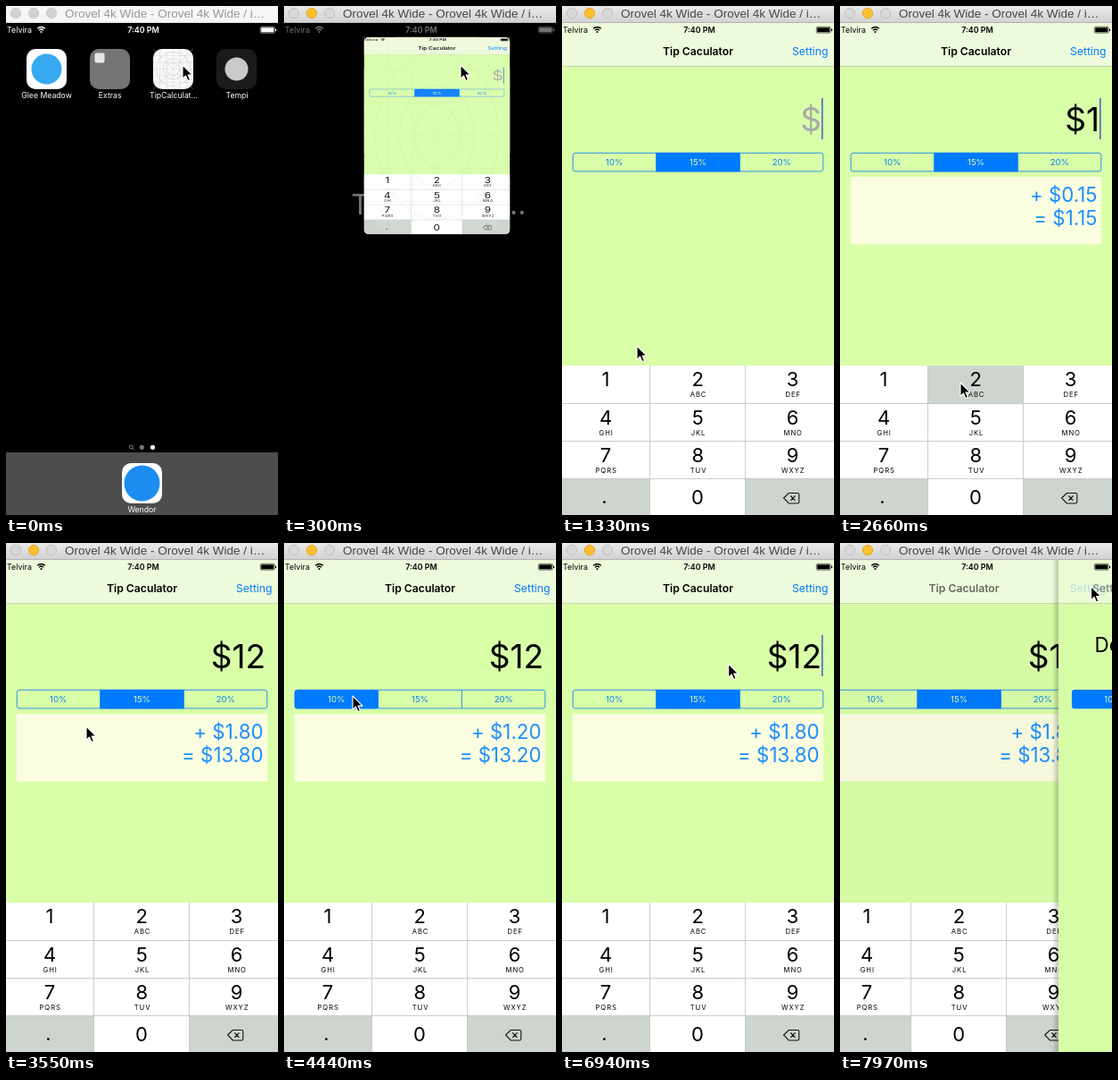
Animation of 305x569 px, one loop 8 s. Source, as an HTML page:

```html
<!DOCTYPE html>
<html lang="en">
<head>
<meta charset="utf-8">
<title>Tip calculator demo</title>
<style>
html, body { margin: 0; width: 100%; height: 100%; overflow: hidden; background: #000; }
svg { display: block; width: 305px; height: 569px; font-family: Inter, "Liberation Sans", sans-serif; }
.mid { text-anchor: middle; }
.end { text-anchor: end; }
.status { font-size: 8.9px; }
.bold { font-weight: 600; }
.label { font-size: 8.7px; fill: #fff; text-anchor: middle; }
.nav { font-size: 12.2px; }
.amount { font-size: 37px; }
.result { font-size: 22.3px; fill: #1f8fff; text-anchor: end; }
.seg { font-size: 9.6px; text-anchor: middle; }
.digit { font-size: 22px; text-anchor: middle; }
.abc { font-size: 7.7px; letter-spacing: .9px; text-anchor: middle; }
.title { font: 13.5px "Liberation Sans", Arial, sans-serif; }
</style>
</head>
<body>
<svg viewBox="0 0 305 569">
  <defs>
    <linearGradient id="bar" x2="0" y2="1">
      <stop offset="0" stop-color="#e9e9e9"/><stop offset="1" stop-color="#d2d2d2"/>
    </linearGradient>
    <linearGradient id="shade">
      <stop offset="0" stop-color="#000" stop-opacity="0"/><stop offset="1" stop-color="#000" stop-opacity=".22"/>
    </linearGradient>
    <clipPath id="round"><rect id="mask" y="19" width="305" height="550"/></clipPath>
    <g id="grid">
      <rect width="45" height="45" rx="10" fill="#f9f9f9"/>
      <g id="lines" fill="none" stroke="#c9c9c9" stroke-width=".6"></g>
    </g>
    <g id="status">
      <text class="status" x="1" y="29.8">Telvira</text>
      <text class="status bold mid" x="154" y="29.8">7:40 PM</text>
      <g fill="none" stroke="currentColor" stroke-width="1.3">
        <path d="M35.2 25.3a6 6 0 0 1 8.6 0M37 27.2a3.6 3.6 0 0 1 5 0"/>
      </g>
      <circle cx="39.5" cy="29" r="1.1"/>
      <rect x="285.3" y="23.3" width="15.900" height="6.800" rx="1.400" fill="none" stroke="currentColor" stroke-width=".6"/>
      <rect x="286.2" y="24.2" width="14.100" height="5" rx=".6"/>
      <rect x="302" y="25.4" width="1.100" height="2.600" rx=".5"/>
    </g>
  </defs>

  <rect width="305" height="569"/>
  <g id="home">
    <rect x="23" y="48" width="45" height="45" rx="10" fill="#fff"/>
    <circle cx="45.5" cy="70.5" r="17" fill="#37a9f0"/>
    <text class="label" x="45.5" y="102.5">Glee Meadow</text>
    <rect x="94" y="48" width="45" height="45" rx="10" fill="#757575"/>
    <rect x="99.5" y="52.5" width="11" height="11" rx="2" fill="#e2e6e8"/>
    <text class="label" x="116.7" y="102.5">Extras</text>
    <use href="#grid" x="165" y="48"/>
    <rect id="press" x="165" y="48" width="45" height="45" rx="10" opacity="0"/>
    <text class="label" x="188" y="102.5">TipCalculat...</text>
    <rect x="236" y="48" width="45" height="45" rx="10" fill="#1b1b1b"/>
    <circle cx="258.5" cy="70.5" r="13" fill="#c9c9c9"/>
    <text class="label" x="259" y="102.5">Tempi</text>
    <circle cx="140.3" cy="493" r="2" fill="none" stroke="#888"/>
    <path d="M141.8 494.5l2 2" stroke="#888"/>
    <circle cx="152.3" cy="493.3" r="2.6" fill="#777"/>
    <circle cx="164.5" cy="493.3" r="2.6" fill="#fff"/>
    <rect y="499" width="305" height="70" fill="#4d4d4d"/>
    <rect x="130" y="511" width="45" height="45" rx="10" fill="#fff"/>
    <circle cx="152.5" cy="533.5" r="20" fill="#1c8cf0"/>
    <text class="label" x="152.5" y="565.8">Wendor</text>
  </g>
  <use id="homeStatus" href="#status" fill="#fff" color="#fff"/>

  <g id="app">
    <g clip-path="url(#round)">
      <rect y="19" width="305" height="550" fill="#d9fea8"/>
      <g id="page">
        <text id="amount" class="amount end" x="291" y="140"></text>
        <rect id="caret" x="291" y="103" width="1.6" height="46" fill="#426bc8"/>
        <g id="tabs"></g>
        <g id="panel">
          <rect x="11.8" y="191" width="281.4" height="75.5" fill="#fafde0"/>
          <text id="tip" class="result" x="288.5" y="218.9"></text>
          <text id="total" class="result" x="288.5" y="245.4"></text>
        </g>
        <g id="keys"></g>
      </g>
      <rect y="19" width="305" height="48.5" fill="#eefadc"/>
      <rect y="67" width="305" height=".7" fill="#bccaa2"/>
      <rect id="dim" y="67" width="305" height="335" opacity="0"/>
      <g id="next">
        <rect x="-7" y="19" width="7" height="550" fill="url(#shade)"/>
        <rect y="19" width="305" height="550" fill="#d7fca6"/>
        <rect y="19" width="305" height="48" fill="#ebfbd3"/>
        <rect y="67" width="305" height=".7" fill="#bccaa2"/>
        <text x="40.7" y="122.2" font-size="22.3">Default</text>
        <rect x="15" y="163.9" width="92" height="21.4" rx="3" fill="#007aff"/>
        <text class="seg" x="61" y="178.4" fill="#d9fea8">10%</text>
        <text class="nav bold" x="38" y="55" fill="#8d9688">Setting</text>
      </g>
      <text id="heading" class="nav bold mid" x="152.5" y="55">Tip Caculator</text>
      <text id="setting" class="nav end" x="298.5" y="55" fill="#007aff">Setting</text>
      <use href="#status" color="#000"/>
    </g>
    <use id="ghost" href="#grid" transform="translate(0 19) scale(6.778 12.222)"/>
  </g>

  <g>
    <rect id="bar1" width="305" height="18.5"/>
    <rect id="edge" y="18" width="305" height="1"/>
    <g id="dots"></g>
    <text id="title" class="title" x="66" y="13">Orovel 4k Wide - Orovel 4k Wide / i…</text>
  </g>
  <path id="cursor" d="M0 0V15.3L3.5 12 6 17.6 8.5 16.5 6.1 11.1H11Z" stroke="#fff" stroke-width="1.1" stroke-linejoin="round"/>
</svg>

<script>
const LOOP = 8000, STEP = 147.65;
const $ = id => document.getElementById(id);
const set = (id, attrs) => { for (const a in attrs) $(id).setAttribute(a, attrs[a]); };
const show = (id, on) => set(id, { opacity: +on });
const mix = (a, b, p) => a + (b - a) * p;
const text = (cls, x, y, s, more = '') => `<text class="${cls}" x="${x}" y="${y}" ${more}>${s}</text>`;

// placeholder icon lines
let lines = 'M0 0L45 45M45 0L0 45';
for (const v of [7.5, 15, 22.5, 30, 37.5]) lines += `M${v} 0V45M0 ${v}H45`;
$('lines').innerHTML = `<path d="${lines}" stroke-width=".35"/>` +
  [7, 11.5, 19].map(r => `<circle cx="22.5" cy="22.5" r="${r}"/>`).join('');

// percent selector
const edges = [11.8, 105.6, 199.4, 293.2], rates = [10, 15, 20];
$('tabs').innerHTML = rates.map((r, i) => {
  const x = edges[i], w = edges[i + 1] - x;
  return `<rect id="tab${i}" x="${x}" y="163.9" width="${w}" height="21.4" rx="${i === 1 ? 0 : 3}" fill="#007aff"/>` +
    text('seg', x + w / 2, 178.4, r + '%', `id="rate${i}"`);
}).join('') +
  `<g fill="none" stroke="#007aff" stroke-width=".8">
     <path d="M105.6 164V185M199.4 164V185"/>
     <rect x="12.2" y="164.3" width="280.6" height="20.6" rx="2.8"/>
   </g>`;

// keypad
const cols = [0, 98.5, 205.5, 305], rows = [402, 444.5, 486.5, 528.5, 569];
const mids = [49, 152.3, 258.5];
const abc = ['', 'ABC', 'DEF', 'GHI', 'JKL', 'MNO', 'PQRS', 'TUV', 'WXYZ'];
let keys = '';
for (let i = 0; i < 12; i++) {
  const c = i % 3, r = Math.floor(i / 3), gray = i === 9 || i === 11;
  keys += `<rect id="key${i}" x="${cols[c]}" y="${rows[r]}" width="${cols[c + 1] - cols[c]}" height="${rows[r + 1] - rows[r]}" fill="${gray ? '#cdd5ce' : '#fff'}"/>`;
  if (i < 9) keys += text('digit', mids[c], rows[r] + 23.2, i + 1) + text('abc', mids[c] + .7, rows[r] + 35, abc[i]);
}
keys += text('digit', 47.3, 555.5, '.') + text('digit', 152, 557.3, 0) +
  `<path d="M0 444.5H305M0 486.5H305M0 528.5H305M98.5 402V569M205.5 402V569" stroke="#bfc3c0" stroke-width=".8"/>
   <path d="M248.6 550L254.300 544.5H264.2Q265.8 544.5 265.8 546V554.5Q265.8 556 264.2 556H254.3ZM256.300 547.5L261.5 552.9M261.5 547.5L256.3 552.9" fill="none" stroke="#111" stroke-width="1.1"/>`;
$('keys').innerHTML = keys;

$('dots').innerHTML = [11, 31, 51].map((x, i) => `<circle id="dot${i}" cx="${x}" cy="8" r="5.7" stroke-width=".8"/>`).join('');

// pointer stops: step, x, y
const stops = [[0, 198, 66], [6, 198, 66], [8, 190, 53], [9, 84, 380], [11, 64, 422], [16, 64, 424],
  [18, 135, 421], [21, 135, 421], [23, 110, 260], [24, 90, 205], [26, 77, 171], [30, 77, 171],
  [31, 86, 172], [33, 150, 173], [35, 215, 171], [41, 215, 171], [44, 160, 172], [46, 160, 172],
  [49, 240, 61], [51, 281.5, 48.5], [55, 281.5, 48.5]];
function pointer(k) {
  const i = stops.findIndex(s => s[0] > k);
  const [a, ax, ay] = stops[i - 1], [b, bx, by] = stops[i], p = (k - a) / (b - a);
  return [mix(ax, bx, p), mix(ay, by, p)];
}

const zoom = [0, 0, .457, .86, .97];

function draw(k) {
  const active = k > 0;
  set('bar1', { fill: active ? 'url(#bar)' : '#f6f6f6' });
  set('edge', { fill: active ? '#b4b4b4' : '#dcdcdc' });
  set('title', { fill: active ? '#474747' : '#989898' });
  for (let i = 0; i < 3; i++) {
    const lit = active && i === 1;
    set('dot' + i, { fill: lit ? '#fdbe2f' : active ? '#d8d8d8' : '#d2d2d2', stroke: lit ? '#dfa023' : active ? '#b9b9b9' : '#c6c6c6' });
  }

  // launch zoom
  const p = k < zoom.length ? zoom[k] : 1;
  const x = mix(165, 0, p), y = mix(48, 19, p), w = mix(45, 305, p), h = mix(45, 550, p ** 1.35);
  const sx = w / 305, sy = h / 550, r = 10 * (1 - p), fade = Math.max(0, 1 - 1.2 * p);
  set('home', { transform: `translate(${x} ${y}) scale(${w / 45}) translate(-165 -48)`, opacity: fade });
  show('homeStatus', fade);
  show('press', k === 1 ? .4 : 0);
  set('app', { transform: `translate(${x} ${y}) scale(${sx} ${sy}) translate(0 -19)`, opacity: p ? 1 : 0 });
  set('mask', { rx: r / sx, ry: r / sy });
  show('ghost', .15 * (1 - p));

  // typing and result
  const typed = k < 14 ? '' : k < 20 ? '1' : '12';
  const sel = k < 28 ? 1 : k < 35 ? 0 : k < 45 ? 2 : 1;
  const tip = typed * rates[sel] / 100;
  $('amount').textContent = '$' + typed;
  set('amount', { fill: typed ? '#000' : '#a9aaa8' });
  show('caret', k < 23 || (k + 3) % 7 < 3);
  show('panel', typed !== '');
  $('tip').textContent = '+ $' + tip.toFixed(2);
  $('total').textContent = '= $' + (+typed + tip).toFixed(2);
  rates.forEach((_, i) => {
    show('tab' + i, i === sel);
    set('rate' + i, { fill: i === sel ? '#d9fea8' : '#0a80f5' });
  });
  set('key0', { fill: k === 12 || k === 13 ? '#cdd5ce' : '#fff' });
  set('key1', { fill: k === 18 || k === 19 ? '#cdd5ce' : '#fff' });

  // push to the settings page
  const push = k >= 54 ? .197 : 0;
  set('page', { transform: `translate(${-96 * push} 0)` });
  set('next', { transform: `translate(${305 * (1 - push)} 0)`, opacity: push ? 1 : 0 });
  show('dim', .1 * push);
  set('heading', { x: 152.5 - 68 * push, opacity: push ? .58 : 1 });
  show('setting', push ? .22 : k === 53 ? .3 : 1);

  set('cursor', { transform: `translate(${pointer(k)})` });
}

function tick(now) {
  draw(Math.floor((now % LOOP + 5) / STEP));
  requestAnimationFrame(tick);
}
draw(0);
requestAnimationFrame(tick);
</script>
</body>
</html>
```
